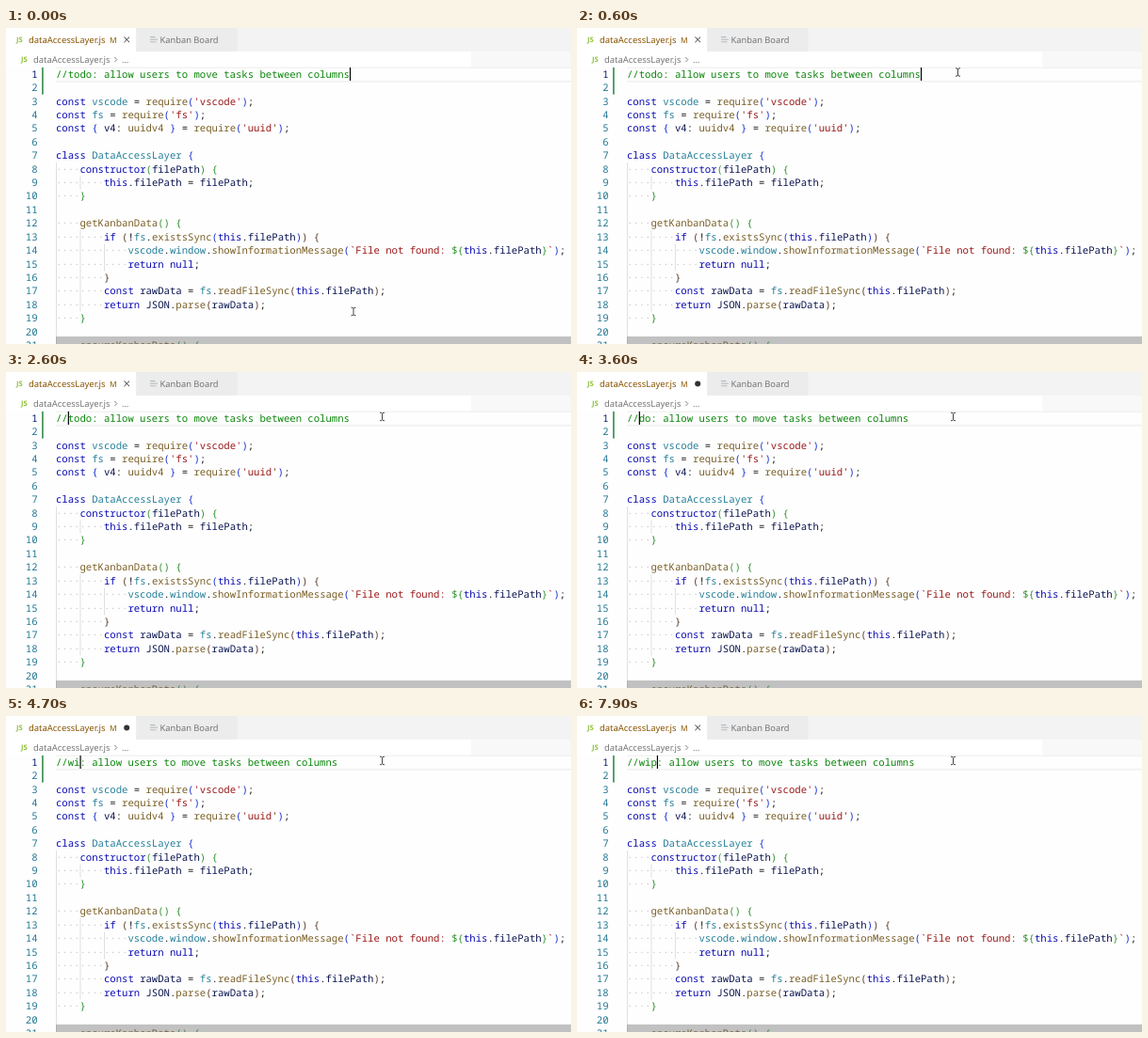
Write an HTML page that moves like this. It is 600x336 px and loops after 8000 ms.

```html
<!DOCTYPE html>
<html lang="en">
<head>
<meta charset="utf-8">
<title>Editor</title>
<style>
  html, body { margin: 0; width: 100%; height: 100%; overflow: hidden; background: #fefefe; }
  svg { display: block; width: 600px; height: 336px; }
  text { white-space: pre; text-rendering: geometricPrecision; }
  .code { font: 10.61px "Noto Sans Mono", "DejaVu Sans Mono", monospace; }
  .ui { font: 9.3px "Noto Sans", "Open Sans", sans-serif; }
  .file { font-size: 9.45px; }
  .badge { font: bold 7.6px "Noto Sans", "Open Sans", sans-serif; fill: #8fc03a; }
</style>
</head>
<body>
<svg id="stage" viewBox="0 0 600 336" xmlns="http://www.w3.org/2000/svg">
  <rect width="600" height="336" fill="#fefefe"/>
  <path d="M53 42.2H600M53 56.8H600" stroke="#eee" stroke-width="1.2"/>
  <g id="editor"></g>
  <rect x="38" y="42" width="1.8" height="28.6" fill="#48985d"/>
  <rect id="caret" y="42" width="1.2" height="14" fill="#000"/>
  <rect x="53" y="328" width="547" height="8" fill="#646464" fill-opacity=".4"/>

  <rect width="600" height="25" fill="#f3f3f3"/>
  <rect width="138" height="25" fill="#fff"/>
  <rect x="138.5" width="107" height="25" fill="#ececec"/>
  <rect y="25" width="494" height="16.5" fill="#fff"/>
  <rect x="494" y="25" width="106" height="16.5" fill="#f8f8f8"/>

  <text class="badge" x="11" y="15">JS</text>
  <text class="ui file" x="24" y="15.6" fill="#895503">dataAccessLayer.js</text>
  <text class="ui" x="110" y="15.6" fill="#895503" style="font-size:8.4px">M</text>
  <circle id="dirty" cx="128.2" cy="12.5" r="3" fill="#333"/>
  <path id="close" d="M125.4 9.6l5.6 5.6m0-5.6l-5.6 5.6" stroke="#333" stroke-width="1" fill="none"/>

  <path d="M153 9.6h5.5M153 12.2h8M153 14.8h6.5" stroke="#b4bcc2" stroke-width="1.1"/>
  <text class="ui" x="163.5" y="15.6" fill="#747474">Kanban Board</text>

  <text class="badge" x="16" y="36.4">JS</text>
  <text class="ui file" x="29" y="36.8" fill="#777">dataAccessLayer.js</text>
  <path d="M115.3 31l2.5 2.6l-2.5 2.6" stroke="#777" stroke-width=".9" fill="none"/>
  <text class="ui" x="123" y="36.8" fill="#777">…</text>

  <g id="pointer" fill="none" stroke="#444" stroke-width="1">
    <path d="M-2.5 -4.3Q0 -4.3 0 -3V3Q0 4.3 -2.5 4.3M2.5 -4.3Q0 -4.3 0 -3M0 3Q0 4.3 2.5 4.3"/>
  </g>
</svg>
<script>
const LEFT = 53, CHAR = 6.366, ROW = 14.42, BASE = 52.7, TOP = 42;

const COLORS = {
  c: "#0a850a", k: "#0a0ab4", t: "#267f99", v: "#0a1450",
  f: "#795e26", s: "#9a1818", p: "#161616", w: "#c4c4c4",
  1: "#1a32d2", 2: "#319331", 3: "#5a3a2a"
};

// Tokens are split by "~"; the first letter of each one picks its colour.
const LINES = [
  "", "",
  "kconst ~tvscode~p = ~frequire~1(~s'vscode'~1)~p;",
  "kconst ~tfs~p = ~frequire~1(~s'fs'~1)~p;",
  "kconst ~1{ ~vv4~p: ~fuuidv4~1 }~p = ~frequire~1(~s'uuid'~1)~p;",
  "",
  "kclass ~tDataAccessLayer ~1{",
  "w····~kconstructor~2(~vfilePath~2) {",
  "w········~kthis~p.~vfilePath~p = ~vfilePath~p;",
  "w····~2}",
  "",
  "w····~fgetKanbanData~2() {",
  "w········~kif ~3(~p!~tfs~p.~fexistsSync~1(~kthis~p.~vfilePath~1)~3) {",
  "w············~tvscode~p.~twindow~p.~fshowInformationMessage~1(~s`File not found: ~2${~kthis~p.~vfilePath~2}~s`~1)~p;",
  "w············~kreturn null~p;",
  "w········~3}",
  "w········~kconst ~vrawData~p = ~tfs~p.~freadFileSync~3(~kthis~p.~vfilePath~3)~p;",
  "w········~kreturn ~vJSON~p.~fparse~3(~vrawData~3)~p;",
  "w····~2}",
  "",
  "w····~fensureKanbanData~2() {"
];

// Indent guides: column, first row, last row.
const GUIDES = [[0, 8, 21], [4, 9, 9], [4, 13, 18], [8, 14, 15]];

// Edits of the first line: time, word after the slashes, caret column (-1 hides it).
const EDITS = [
  [0, "todo", 49], [1100, "todo", -1], [1600, "todo", 49],
  [2000, "todo", 0], [2500, "todo", 1], [2600, "todo", 2],
  [3100, "odo", 2], [3400, "do", 2], [3700, "o", 2], [4100, "", 2],
  [4600, "w", 3], [4700, "wi", 4], [4900, "wip", 5],
  [5400, "wip", -1], [5900, "wip", 5], [6400, "wip", -1],
  [6900, "wip", 5], [7400, "wip", -1], [7900, "wip", 5]
];

const byId = id => document.getElementById(id);
const editor = byId("editor");
const caret = byId("caret"), pointer = byId("pointer");
const dirty = byId("dirty"), closeMark = byId("close");

function add(parent, tag, attrs, content = "") {
  const el = document.createElementNS("http://www.w3.org/2000/svg", tag);
  for (const key in attrs) el.setAttribute(key, attrs[key]);
  el.textContent = content;
  return parent.appendChild(el);
}

function addCode(x, row, attrs, content) {
  return add(editor, "text", { class: "code", x, y: BASE + ROW * (row - 1), ...attrs }, content);
}

for (const [col, first, last] of GUIDES) {
  add(editor, "rect", {
    x: LEFT + col * CHAR + 0.1, y: TOP + ROW * (first - 1),
    width: 0.8, height: ROW * (last - first + 1), fill: "#d9d9d9"
  });
}

LINES.forEach((line, i) => {
  const row = i + 1;
  addCode(33.6, row, { "text-anchor": "end", fill: row === 1 ? "#0b216f" : "#237893" }, row);
  if (!line) return;
  const text = addCode(LEFT, row, {});
  for (const token of line.split("~")) {
    add(text, "tspan", { fill: COLORS[token[0]] }, token.slice(1));
  }
});

const comment = addCode(LEFT, 1, { fill: COLORS.c });

function pointerAt(t) {
  if (t >= 900) return [399.5, 47.5];
  if (t >= 700) return [401, 47.5];
  const p = Math.floor(t / 100) / 6;
  const e = p * p * (3 - 2 * p);
  return [369 + 35.5 * e, 301.5 - 254.5 * e];
}

function draw(t) {
  const [, word, col] = EDITS.findLast(edit => edit[0] <= t);
  const line = `//${word}: allow users to move tasks between columns`;
  if (comment.textContent !== line) comment.textContent = line;

  caret.style.display = col < 0 ? "none" : "";
  caret.setAttribute("x", LEFT + Math.max(col, 0) * CHAR);

  const unsaved = t >= 3100 && t < 6400;
  dirty.style.display = unsaved ? "" : "none";
  closeMark.style.display = unsaved ? "none" : "";

  pointer.setAttribute("transform", `translate(${pointerAt(t)})`);
}

const start = performance.now();
function tick() {
  draw((performance.now() - start) % 8000);
  requestAnimationFrame(tick);
}
draw(0);
requestAnimationFrame(tick);
</script>
</body>
</html>
```
